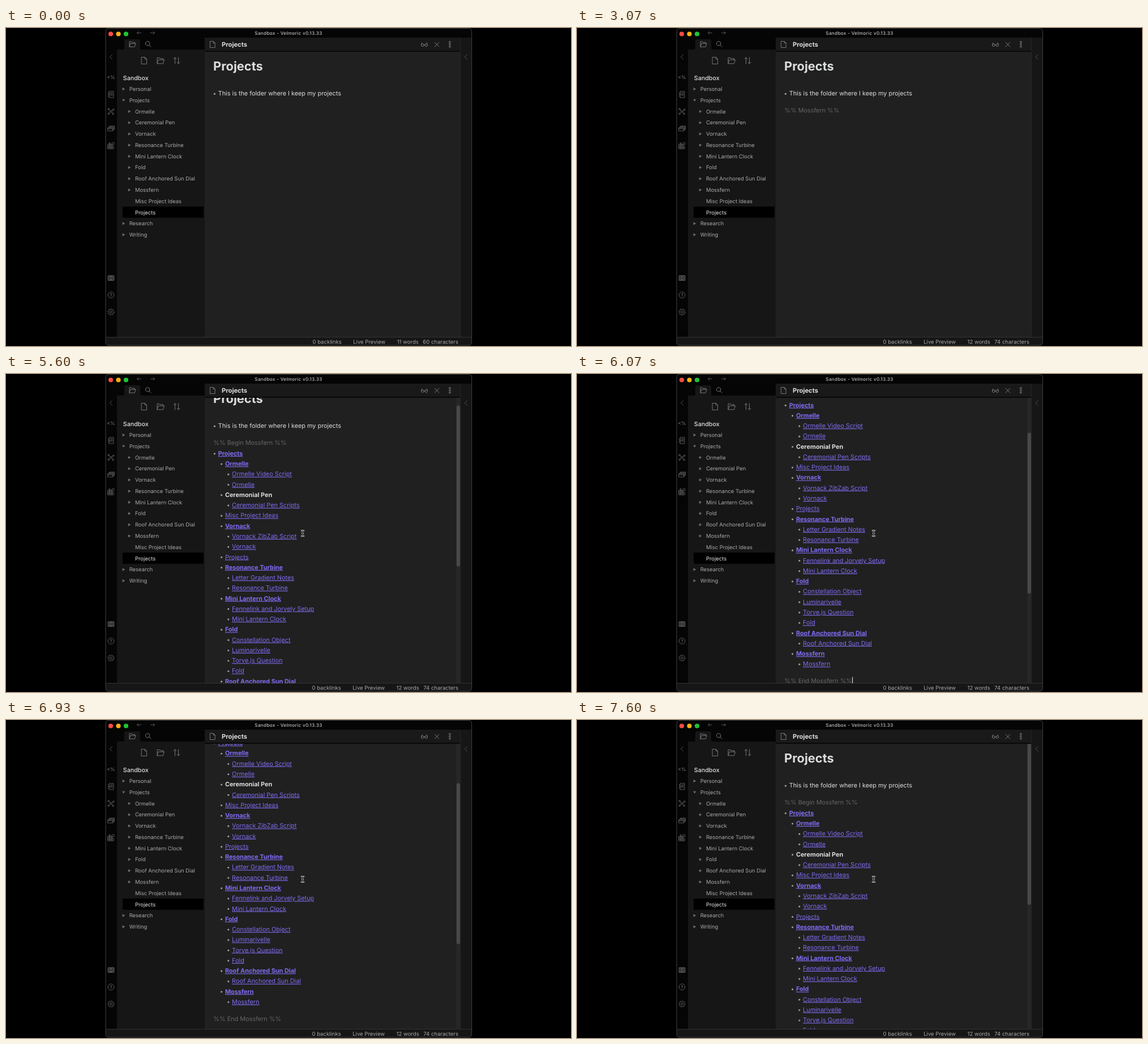
Animation of 998x561 px, one loop 8 s. Source, as an HTML page:

```html
<!DOCTYPE html>
<html lang="en">
<head>
<meta charset="utf-8">
<title>Notes</title>
<style>
html, body { margin: 0; width: 100%; height: 100%; overflow: hidden; background: #000; }
svg { display: block; width: 100%; height: 100%; }
text { font-family: Inter, sans-serif; font-optical-sizing: none; text-rendering: geometricPrecision; white-space: pre; }
.side { font-size: 9.45px; fill: #a9a9a9; }
.status { font-size: 9.55px; fill: #a9a9a9; }
.body { font-size: 10.85px; fill: #dcddde; }
.note { fill: #666; }
.link { fill: #7f6df2; text-decoration: underline; }
.bold { font-weight: 700; }
.icon { fill: none; stroke: #808080; stroke-width: .9; stroke-linecap: round; stroke-linejoin: round; }
.ribbon { stroke: #686868; stroke-width: .85; }
.dim { stroke: #5c5c5c; }
</style>
</head>
<body>
<svg viewBox="0 0 998 561">
  <defs><clipPath id="pane"><rect x="351" y="42" width="452" height="503.5"/></clipPath></defs>
  <rect width="998" height="561" fill="#000"/>
  <g id="chrome"></g>
  <g clip-path="url(#pane)">
    <g id="doc"></g>
    <g id="bar">
      <rect x="795.3" y="42" width="7" height="504" fill="#272727"/>
      <rect id="thumb" x="795.8" y="42" width="6.2" height="284" rx="3" fill="#484848"/>
    </g>
  </g>
  <text id="status" class="status" x="799" y="557" text-anchor="end"></text>
  <g id="mouse" stroke-linecap="round" fill="none"></g>
</svg>
<script>
const $ = id => document.getElementById(id);
const rect = (x, y, w, h, fill, more = '') => `<rect x="${x}" y="${y}" width="${w}" height="${h}" fill="${fill}" ${more}/>`;
const dot = (x, y, r, fill) => `<circle cx="${x}" cy="${y}" r="${r}" fill="${fill}"/>`;
const text = (x, y, cls, str, more = '') => `<text x="${x}" y="${y}" class="${cls}" ${more}>${str}</text>`;
const icon = (x, y, d, cls = '') => `<path class="icon ${cls}" transform="translate(${x} ${y})" d="${d}"/>`;
const ring = (x, y, r) => `M${x - r} ${y}a${r} ${r} 0 1 0 ${2 * r} 0a${r} ${r} 0 1 0 ${-2 * r} 0`;

const FILE = 'M-4.5-6H1.3L4.5-2.8V6H-4.5ZM1.3-6V-2.8H4.5';
const FOLDER = 'M-6 5V-5H-2L-.8-3.5H4.6V-1.4M-6 5L-3.8-1.4H6.5L4.6 5Z';
const BACK = 'M2-4L-2 0L2 4';
const IBEAM = 'M-2.1-4.9Q0-4.9 0-3.3V3.3Q0 4.9-2.1 4.9M2.1-4.9Q0-4.9 0-3.3V3.3Q0 4.9 2.1 4.9M-1 0H1';

// Sidebar rows: depth, arrow (> closed, v open, . none), label
const TREE = ['0> Personal', '0v Projects', '1> Ormelle', '1> Ceremonial Pen', '1> Vornack',
  '1> Resonance Turbine', '1> Mini Lantern Clock', '1> Fold', '1> Roof Anchored Sun Dial',
  '1> Mossfern', '1. Misc Project Ideas', '1. Projects', '0> Research', '0> Writing'];

// Note list: depth, style (b bold link, l link, s strong), label
const LIST = ['0b Projects', '1b Ormelle', '2l Ormelle Video Script', '2l Ormelle', '1s Ceremonial Pen',
  '2l Ceremonial Pen Scripts', '1l Misc Project Ideas', '1b Vornack', '2l Vornack ZibZab Script',
  '2l Vornack', '1l Projects', '1b Resonance Turbine', '2l Letter Gradient Notes',
  '2l Resonance Turbine', '1b Mini Lantern Clock', '2l Fennelink and Jorvely Setup',
  '2l Mini Lantern Clock', '1b Fold', '2l Constellation Object', '2l Luminarivelle',
  '2l Torve.js Question', '2l Fold', '1b Roof Anchored Sun Dial', '2l Roof Anchored Sun Dial',
  '1b Mossfern', '2l Mossfern'];
const STYLE = { b: 'body link bold', l: 'body link', s: 'body bold' };

function gear() {
  let d = ring(0, 0, 1.9);
  for (let i = 0; i <= 32; i++) {
    const a = (i + .5) * Math.PI / 16, r = i % 4 < 2 ? 5.6 : 4.3;
    d += (i ? 'L' : 'M') + (r * Math.cos(a)).toFixed(2) + ' ' + (r * Math.sin(a)).toFixed(2);
  }
  return d;
}

function drawTree() {
  return TREE.map((row, i) => {
    const depth = +row[0], y = 107.7 + i * 19.77, x = 207.7 + depth * 10.2;
    const open = row.endsWith('Projects') && depth === 1;
    const arrow = { '>': 'M-2-2.6L2.6 0L-2 2.6Z', 'v': 'M-2.6-1.8H2.6L0 2.4Z', '.': '' }[row[1]];
    return (open ? rect(206, y - 10.1, 143, 19.8, '#000', 'rx="1.5"') : '') +
      (arrow && `<path transform="translate(${x} ${y})" d="${arrow}" fill="#6e6e6e"/>`) +
      text(x + 10, y + 3.4, 'side', row.slice(3), open ? 'style="fill:#e4e4e4"' : '');
  }).join('');
}

function drawChrome() {
  return rect(176.2, .6, 646.4, 559, '#050505', 'rx="5"') +
    rect(196, 38, 155, 507, '#161616') +
    '<path d="M206 38.2Q209 38 209 35V23Q209 20 212 20H234Q237 20 237 23V35Q237 38 240 38.2Z" fill="#161616"/>' +
    rect(351, 17, 452, 23.5, '#191919') + rect(351, 42, 452, 503.5, '#202020') +
    rect(351, 40, 452, 2, '#090909') +
    rect(803, 17, 19, 528, '#161616') + rect(802.4, 17, .8, 528, '#2b2b2b') +
    '<path d="M176.7 545.5H822.2V554.6Q822.2 559.4 817.4 559.4H181.4Q176.7 559.4 176.7 554.6Z" fill="#161616"/>' +
    rect(176.6, 545, 645.8, .9, '#363636') +
    rect(176, .5, 646.6, 559.3, 'none', 'rx="5" stroke="#4a4a4a" stroke-width=".9"') +
    dot(185, 10.5, 4.1, '#fe4a43') + dot(198.5, 10.5, 4.1, '#f7b00f') + dot(212, 10.5, 4.1, '#1fc434') +
    icon(235, 8.6, 'M3.6 0H-3.6M-1-2.6L-3.6 0L-1 2.6', 'dim') +
    icon(259, 8.6, 'M-3.6 0H3.6M1-2.6L3.6 0L1 2.6', 'dim') +
    text(499, 11.6, '', 'Sandbox - Velmoric v0.13.33',
      'text-anchor="middle" font-size="8.2" font-weight="500" letter-spacing=".29" fill="#bdbdbd"') +
    icon(223.3, 28.5, 'M-5.3 4.4V-4.4H-1.8L-.7-3.1H4V-1.2M-5.3 4.4L-3.4-1.2H5.8L4 4.4Z') +
    icon(251, 28.2, ring(-.8, -.8, 3.7) + 'M2 2L5 5') +
    icon(244, 57.5, FILE) + icon(273, 57.5, FOLDER) +
    icon(301.5, 57.5, 'M-3 5.5V-5.5M-5.5-3L-3-5.5L-.6-3M3-5.5V5.5M.6 3L3 5.5L5.5 3') +
    text(206.8, 91.8, '', 'Sandbox', 'font-size="10.7" font-weight="500" fill="#e0e0e0"') +
    icon(365, 29, 'M-4.2-5.5H1.2L4.2-2.5V5.5H-4.2ZM1.2-5.5V-2.5H4.2') +
    text(381, 32.8, 'bold', 'Projects', 'font-size="11.2" fill="#dcddde"') +
    icon(739, 29, ring(-3.2, 1.2, 2.3) + ring(3.2, 1.2, 2.3) + 'M-1 .8Q0 0 1 .8M-5.5 .8L-4-3M5.5 .8L4-3') +
    icon(761, 29.2, 'M-3.8-3.8L3.8 3.8M3.8-3.8L-3.8 3.8') +
    icon(784, 28.8, ring(0, -4, 1.4) + ring(0, 0, 1.4) + ring(0, 4, 1.4)) +
    icon(185.5, 51, BACK, 'dim') + icon(812.2, 51, BACK, 'dim') + drawRibbon() + drawTree();
}

function drawRibbon() {
  const x = 185.5;
  return text(x, 90.2, '', '&lt;%', 'text-anchor="middle" font-size="8.6" font-weight="500" fill="#707070"') +
    icon(x, 117.3, 'M-3-5.5H4.5V5.5H-3ZM-1-3H2.8M-1-.8H2.8M-1 1.4H2.8M-5.2-2.8H-3M-5.2 0H-1.5M-5.2 2.8H-3', 'ribbon') +
    icon(x, 147.2, ring(0, 0, 1.7) + ring(-4.3, -4.2, 1.3) + ring(4.3, -3.2, 1.3) + ring(-4.3, 4, 1.3) +
      ring(3.8, 4.2, 1.3) + 'M-3.3-3.3L-1.3-1.2M3.1-2.5L1.5-.9M-3.3 3.1L-1.3 1.2M2.9 3.3L1.3 1.2', 'ribbon') +
    icon(x, 177.3, 'M-5.5-1.2H3.2V4.4H-5.5ZM-4-1.2V-2.8H4.6V2.8H3.2M-2.4-2.8V-4.4H6V1.2H4.6M-5.5 .6H3.2', 'ribbon') +
    icon(x, 207.5, 'M-5.5-2H2V5.6H-5.5ZM-3 -2V5.6M-.5-2V5.6M-5.5 .5H2M-5.5 3H2M2 1.8H4.8V5.6H2' +
      ring(-2.4, -4, 1.2) + ring(3.6, -3.4, 2.2), 'ribbon') +
    rect(179.6, 436.2, 11.8, 9.8, '#505050', 'rx="1.5"') +
    '<path d="M183.6 438.4H181.8V443.8H183.6M187.4 438.4H189.2V443.8H187.4M184.6 439.6V442.6M186.4 439.6V442.6" fill="none" stroke="#111" stroke-width=".9"/>' +
    icon(x, 471, ring(0, 0, 5.4), 'ribbon') +
    text(x, 474, '', '?', 'text-anchor="middle" font-size="8" fill="#808080"') +
    icon(x, 501, gear(), 'ribbon');
}

const bullet = (x, y) => dot(x, y, 1.6, '#999');

function drawDoc() {
  const rows = LIST.map((row, i) => {
    const x = 374.7 + row[0] * 12.2, y = 164 + i * 18.27;
    return bullet(x - 6.3, y + .6) + text(x, y + 3.8, STYLE[row[1]], row.slice(3));
  }).join('');
  return text(366, 75.2, 'bold', 'Projects', 'font-size="21.85" fill="#dcddde"') +
    bullet(368.4, 116.2) + text(374.7, 119.4, 'body', 'This is the folder where I keep my projects') +
    '<text id="typed" class="body note" x="366.3" y="149.4"></text>' +
    `<g id="list">${rows}${text(366.3, 654.7, 'body note', '%% End Mossfern %%', 'id="end"')}</g>` +
    rect(0, 0, 1.1, 13.4, '#e2e2e2', 'id="caret"');
}

$('chrome').innerHTML = drawChrome();
$('doc').innerHTML = drawDoc();
$('mouse').innerHTML = `<path stroke="#e8e8e8" stroke-width="2.3" d="${IBEAM}"/><path stroke="#111" stroke-width=".9" d="${IBEAM}"/>`;

const TICK = 1000 / 15, TICKS = 120, BLINK = 9, EXPAND = 64, SETTLED = 69;
const TYPED = '%% Mossfern %%';
const KEYS = [1, 7, 10, 12, 14, 16, 19, 22, 25, 28, 30, 31, 35, 37];
const SCROLL = [[81, 0], [84, 24], [91, 109.2], [96, 140], [100, 143], [104, 123.6], [109, 45], [114, 0]];
const MOUSE_IN = 73, MOUSE_STOP = 79;

function spline(pts, t) {
  const last = pts.length - 1;
  if (t <= pts[0][0]) return pts[0][1];
  if (t >= pts[last][0]) return pts[last][1];
  const slope = i => i === 0 || i === last ? 0 : (pts[i + 1][1] - pts[i - 1][1]) / (pts[i + 1][0] - pts[i - 1][0]);
  const i = pts.findIndex(p => p[0] > t) - 1;
  const [t0, a] = pts[i], [t1, b] = pts[i + 1];
  const h = t1 - t0, u = (t - t0) / h, v = 1 - u;
  return v * v * (1 + 2 * u) * a + u * u * (3 - 2 * u) * b + h * u * v * (v * slope(i) - u * slope(i + 1));
}

const show = (el, on) => el.setAttribute('visibility', on ? 'visible' : 'hidden');
const keysBy = tick => KEYS.filter(k => k <= tick).length;

function draw(tick) {
  const count = keysBy(tick), expanded = tick >= EXPAND;
  const typed = $('typed'), caret = $('caret');
  typed.textContent = expanded ? '%% Begin Mossfern %%' : TYPED.slice(0, count);
  show($('list'), expanded);
  show($('bar'), expanded);

  const line = expanded ? $('end') : typed;
  const since = expanded ? Math.max(0, tick - SETTLED) : tick - KEYS[count - 1];
  show(caret, count > 0 && Math.floor(since / BLINK) % 2 === 0);
  caret.setAttribute('x', 366.3 + (line.textContent ? line.getComputedTextLength() : 0));
  caret.setAttribute('y', line.getAttribute('y') - 10.9);

  const scroll = spline(SCROLL, tick);
  $('doc').setAttribute('transform', `translate(0 ${-scroll})`);
  $('thumb').setAttribute('y', 42 + scroll * .563);

  const go = Math.min(1, Math.max(0, (tick - MOUSE_IN) / (MOUSE_STOP - MOUSE_IN)));
  const left = (1 - go) ** 2;
  show($('mouse'), tick >= MOUSE_IN);
  $('mouse').setAttribute('transform', `translate(${524 + 8 * left} ${281 - 74 * left})`);

  const words = tick >= 31 ? 12 : 11, chars = 60 + keysBy(tick - 1);
  $('status').innerHTML = '0 backlinks<tspan dx="20.5">Live Preview</tspan>' +
    `<tspan dx="20.5">${words} words</tspan><tspan dx="7.5">${chars} characters</tspan>`;
}

let shown = -1;
const start = performance.now();
function frame() {
  const tick = Math.floor((performance.now() - start + 4) / TICK) % TICKS;
  if (tick !== shown) draw(shown = tick);
  requestAnimationFrame(frame);
}
frame();
</script>
</body>
</html>
```
